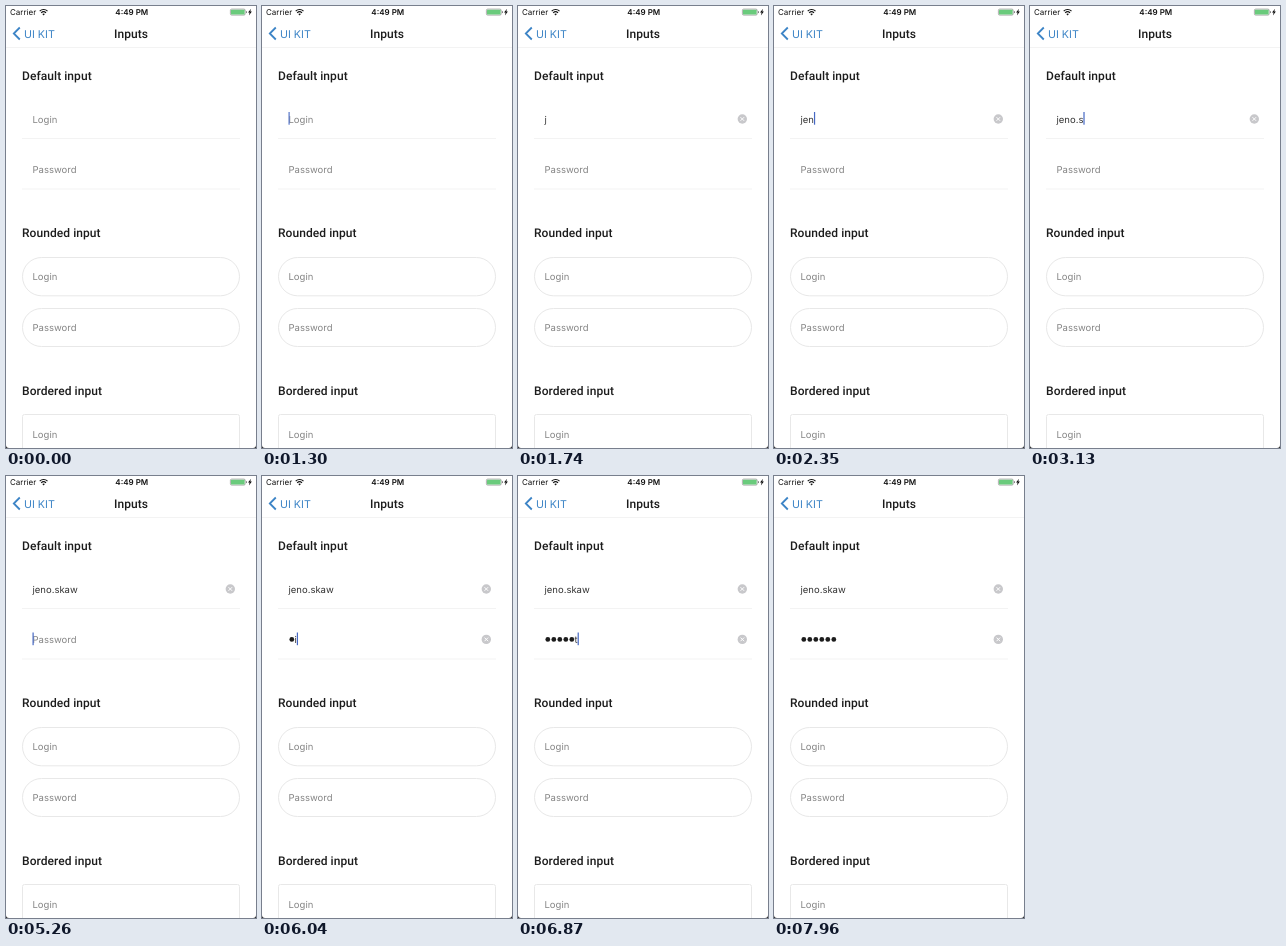
Write an HTML page that moves like this. It is 250x442 px and loops after 8 s.

```html
<!DOCTYPE html>
<html lang="en">
<head>
<meta charset="utf-8">
<title>Inputs</title>
<style>
  html, body { margin: 0; width: 100%; height: 100%; overflow: hidden; background: #222; }
  svg { display: block; width: 250px; height: 442px; background: #fff; border-radius: 0 0 3px 3px; }
  text { font: 9.5px Inter, sans-serif; fill: #333; white-space: pre; text-rendering: geometricPrecision; }
  .status { font-size: 8px; fill: #111; }
  .time { font-weight: 600; text-anchor: middle; }
  .back { font-size: 10.7px; fill: #3c84c6; }
  .title { font: 500 12px Roboto, sans-serif; letter-spacing: .06px; fill: #1c1c1c; }
  .hint { fill: #858585; }
  .box { fill: none; stroke: #e8e8e8; }
  .rule { stroke: #f3f3f3; }
</style>
</head>
<body>
<svg viewBox="0 0 250 442">
  <text class="status" x="4" y="9">Carrier</text>
  <g fill="none" stroke="#111" stroke-width="1.2">
    <path d="M33.7 5.1a5.6 5.6 0 0 1 7.8 0M35.2 6.8a3.4 3.4 0 0 1 4.8 0"/>
  </g>
  <path d="M36.3 8a1.9 1.9 0 0 1 2.6 0l-1.3 1.5z" fill="#111"/>
  <text class="status time" x="125.8" y="9">4:49 PM</text>
  <rect x="224.4" y="3.1" width="14.8" height="6" rx="1.3" fill="none" stroke="#777" stroke-width=".6"/>
  <rect x="225" y="3.7" width="13.6" height="4.8" rx=".6" fill="#6acb7c"/>
  <path d="M240 5v2.2q.9-.3.9-1.1t-.9-1.1z" fill="#555"/>
  <path d="M245 2.8l-3 3.7h1.6l-.7 2.9 3-3.9h-1.6z" fill="#111"/>

  <path d="M13.8 21.5l-6 6 6 6" fill="none" stroke="#3c84c6" stroke-width="1.8"/>
  <text class="back" x="18" y="32">UI KIT</text>
  <text class="title" x="125" y="32" text-anchor="middle">Inputs</text>
  <path class="rule" d="M0 41.5H250"/>

  <text class="title" x="16" y="74">Default input</text>
  <path class="rule" d="M16 132.5H234M16 183H234"/>

  <text class="title" x="16" y="231.2">Rounded input</text>
  <rect class="box" x="16.5" y="251.5" width="217" height="38.3" rx="19.15"/>
  <text class="hint" x="26.5" y="274">Login</text>
  <rect class="box" x="16.5" y="302.5" width="217" height="38" rx="19"/>
  <text class="hint" x="26.5" y="324.8">Password</text>

  <text class="title" x="16" y="388.6">Bordered input</text>
  <rect class="box" x="16.5" y="408.5" width="217" height="39" rx="2"/>
  <text class="hint" x="26.5" y="431.5">Login</text>

  <g id="fields"></g>
  <rect id="caret" width="1.2" height="12.7" fill="#4668c4"/>
</svg>
<script>
const LOOP = 8000, LEFT = 26.5, DOT = 6;
const SWITCH = 5260, MASK_LAST = 7870;
const caret = document.getElementById('caret');

// Caret opacity: [time, value], linear in between
const blink = [
  [1000, 0], [1040, 1], [1280, 1], [1500, 0], [1870, 0], [2040, 1],
  [4330, 1], [4520, 0], [4850, 0], [5040, 1], [5500, 1], [5690, 0],
  [5850, 0], [6000, 1], [7330, 1], [7520, 0]
];

function field(hint, value, y, keys, secret) {
  const g = document.createElementNS('http://www.w3.org/2000/svg', 'g');
  const dots = [...value].map((_, i) =>
    `<circle cx="${LEFT + 3.3 + i * DOT}" cy="${y}" r="2.4" fill="#1c1c1c"/>`).join('');
  g.innerHTML = `<text class="hint" x="${LEFT}" y="${y + 3.6}">${hint}</text>
    <text y="${y + 3.6}"></text>${secret ? dots : ''}
    <g class="clear"><circle cx="224.3" cy="${y}" r="4.7" fill="#c8c8cb"/>
    <path d="M222.5 ${y - 1.8}l3.6 3.6m0-3.6l-3.6 3.6" stroke="#fff" stroke-width="1"/></g>`;
  document.getElementById('fields').append(g);
  const [hintText, typed] = g.querySelectorAll('text');
  const circles = secret ? g.querySelectorAll(':scope > circle') : [];
  const clear = g.querySelector('.clear');

  // Shows the field at time t and returns the x of its end
  return t => {
    const count = keys.filter(k => k <= t).length;
    const masked = !secret ? 0 : t >= MASK_LAST ? count : Math.max(0, count - 1);
    const x = LEFT + masked * DOT;
    hintText.style.display = count ? 'none' : '';
    clear.style.display = count ? '' : 'none';
    circles.forEach((c, i) => c.style.display = i < masked ? '' : 'none');
    typed.textContent = value.slice(masked, count);
    typed.setAttribute('x', x);
    return x + (count > masked ? typed.getComputedTextLength() : 0);
  };
}

const login = field('Login', 'jeno.skaw', 113,
  [1740, 1950, 2220, 2480, 2780, 3000, 3390, 3610, 3780]);
const password = field('Password', 'dinest', 163.4,
  [5780, 6000, 6220, 6430, 6610, 6830], true);

function caretAlpha(t) {
  const i = blink.findIndex(([time]) => time > t);
  if (i < 1) return 0;
  const [t0, a] = blink[i - 1], [t1, b] = blink[i];
  return a + (b - a) * (t - t0) / (t1 - t0);
}

function draw(now) {
  const t = now % LOOP;
  const ends = [login(t), password(t)];
  const active = t < SWITCH ? 0 : 1;
  caret.setAttribute('x', ends[active]);
  caret.setAttribute('y', active ? 156.5 : 106);
  caret.setAttribute('opacity', caretAlpha(t));
  requestAnimationFrame(draw);
}
requestAnimationFrame(draw);
</script>
</body>
</html>
```
